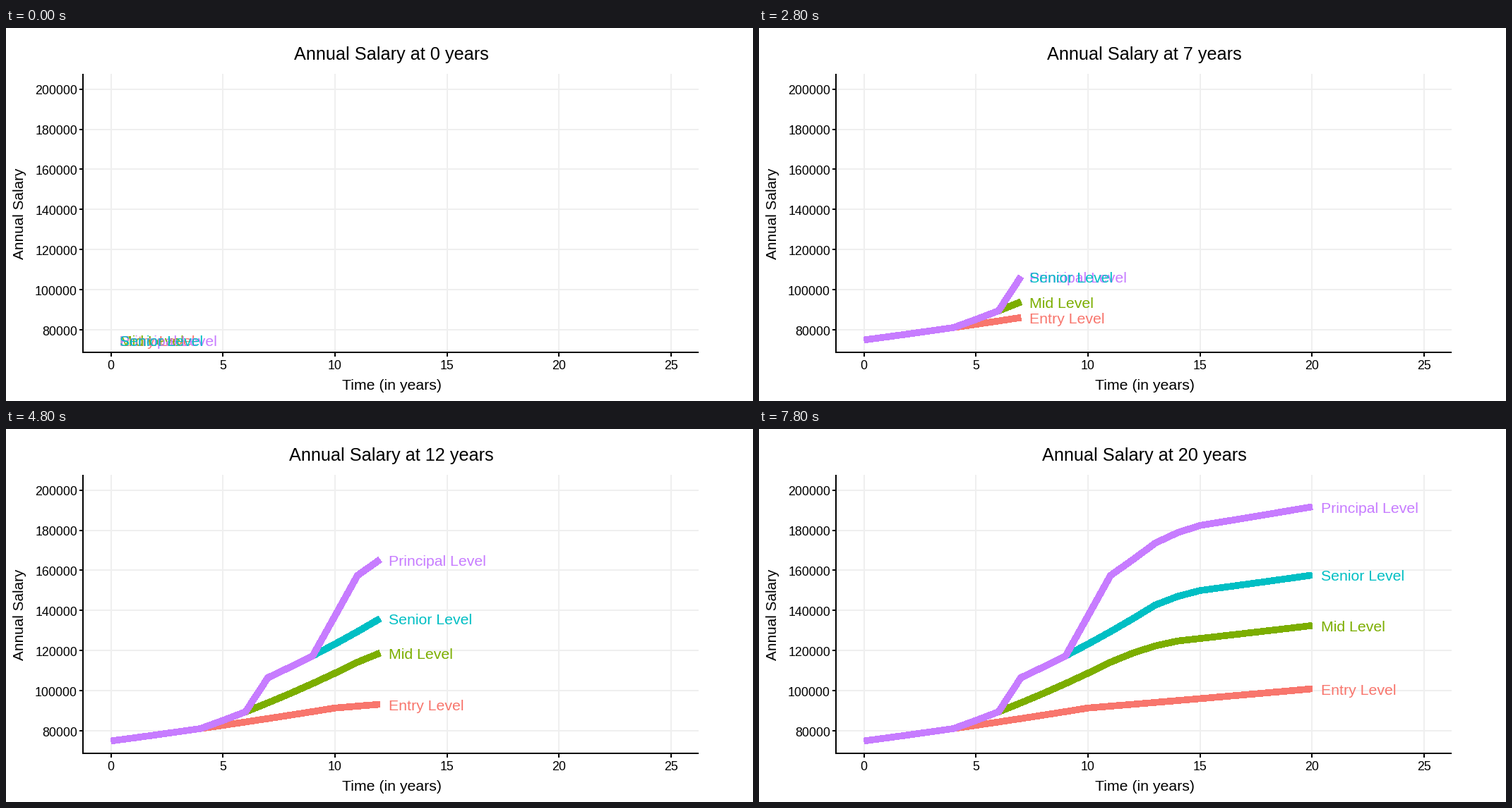
A matplotlib script that plays this animation: 1058 px wide and 529 px high, repeating every 8 s.

```python
import numpy as np
import matplotlib.pyplot as plt
from matplotlib.animation import FuncAnimation

W, H, DPI = 1058, 529, 64
PT = 72 / DPI
FRAMES, INTERVAL = 40, 200
YEARS, SPAN = 25, 49          # the full run covers 25 years in 49 steps

plt.rcParams["font.family"] = "Liberation Sans"


def px(year):
    return 148.8 + 31.73 * np.asarray(year)


def py(salary):
    return 428.2 - (np.asarray(salary) - 80000) * 341.6 / 120000


def grow(*steps):
    """Salaries from (years, percent raise) pairs."""
    rates = [1 + pct / 100 for n, pct in steps for _ in range(n)]
    return 75000 * np.cumprod([1] + rates)


# name, colour, salary per year
LEVELS = [
    ("Entry Level", "#F8766D", grow((10, 2), (15, 1))),
    ("Mid Level", "#7CAE00",
     grow((4, 2), (7, 5), (1, 4), (1, 3), (1, 2), (11, 1))),
    ("Senior Level", "#00BFC4",
     grow((4, 2), (2, 5), (1, 19), (6, 5), (1, 3), (1, 2), (10, 1))),
    ("Principal Level", "#C77CFF",
     grow((4, 2), (2, 5), (1, 19), (2, 5), (1, 17), (1, 14.6), (2, 5),
          (1, 3), (1, 2), (10, 1))),
]
TEXT_ORDER = {"Entry Level": 6, "Mid Level": 7,
              "Principal Level": 8, "Senior Level": 9}

# each whole year falls on a whole animation step
KEYS = np.round(np.arange(YEARS + 1) * SPAN / YEARS)

fig = plt.figure(figsize=(W / DPI, H / DPI), dpi=DPI, facecolor="white")
ax = fig.add_axes([0, 0, 1, 1])
ax.set_xlim(0, W)
ax.set_ylim(H, 0)
ax.axis("off")


def stroke(xs, ys, color, width, z):
    line, = ax.plot(xs, ys, color=color, lw=width * PT, zorder=z,
                    solid_capstyle="butt", solid_joinstyle="round",
                    antialiased=False)
    return line


def label(x, y, text, size, color="black", ha="center", z=5, **kw):
    return ax.text(x, y, text, fontsize=size * PT, color=color, ha=ha,
                   va="baseline", zorder=z, **kw)


LEFT, RIGHT, TOP, BOTTOM = 109, 981.4, 65, 460

for year in range(0, 26, 5):
    x = float(px(year))
    stroke([x, x], [TOP, BOTTOM], "#EFEFEF", 2, 1)
    stroke([x, x], [BOTTOM, 465.5], "black", 2, 4)
    label(x - 0.4, 483.7, str(year), 17.7)

for salary in range(80000, 200001, 20000):
    y = float(py(salary))
    stroke([LEFT, RIGHT], [y, y], "#EFEFEF", 2, 1)
    stroke([103.5, LEFT], [y, y], "black", 2, 4)
    label(101, y + 7.3, str(salary), 17.7, ha="right")

stroke([LEFT, LEFT], [TOP, BOTTOM + 1], "black", 2, 4)
stroke([LEFT - 1, RIGHT], [BOTTOM, BOTTOM], "black", 2, 4)

label(546, 513.3, "Time (in years)", 21.2)
label(25, 263.5, "Annual Salary", 20.8, rotation=90, rotation_mode="anchor")
title = label(545.7, 45, "", 25.3)

curves = [stroke([], [], color, 8.6, 3) for _, color, _ in LEVELS]
tags = [label(0, 0, name, 21.2, color, "left", TEXT_ORDER[name])
        for name, color, _ in LEVELS]


def update(step):
    now = np.interp(step, KEYS, np.arange(YEARS + 1))
    past = np.arange(int(now) + 1)
    years = np.append(past, now) if now > past[-1] else past
    for (_, _, pay), curve, tag in zip(LEVELS, curves, tags):
        ys = py(np.interp(years, np.arange(YEARS + 1), pay))
        if step:
            curve.set_data(px(years), ys)
        else:
            curve.set_data([], [])
        tag.set_position((px(now) + 12.1, ys[-1] + 8.2))
    title.set_text(f"Annual Salary at {round(step * YEARS / SPAN)} years")
    return [*curves, *tags, title]


anim = FuncAnimation(fig, update, frames=FRAMES, interval=INTERVAL,
                     repeat=True, repeat_delay=0, blit=False)
plt.show()
```
